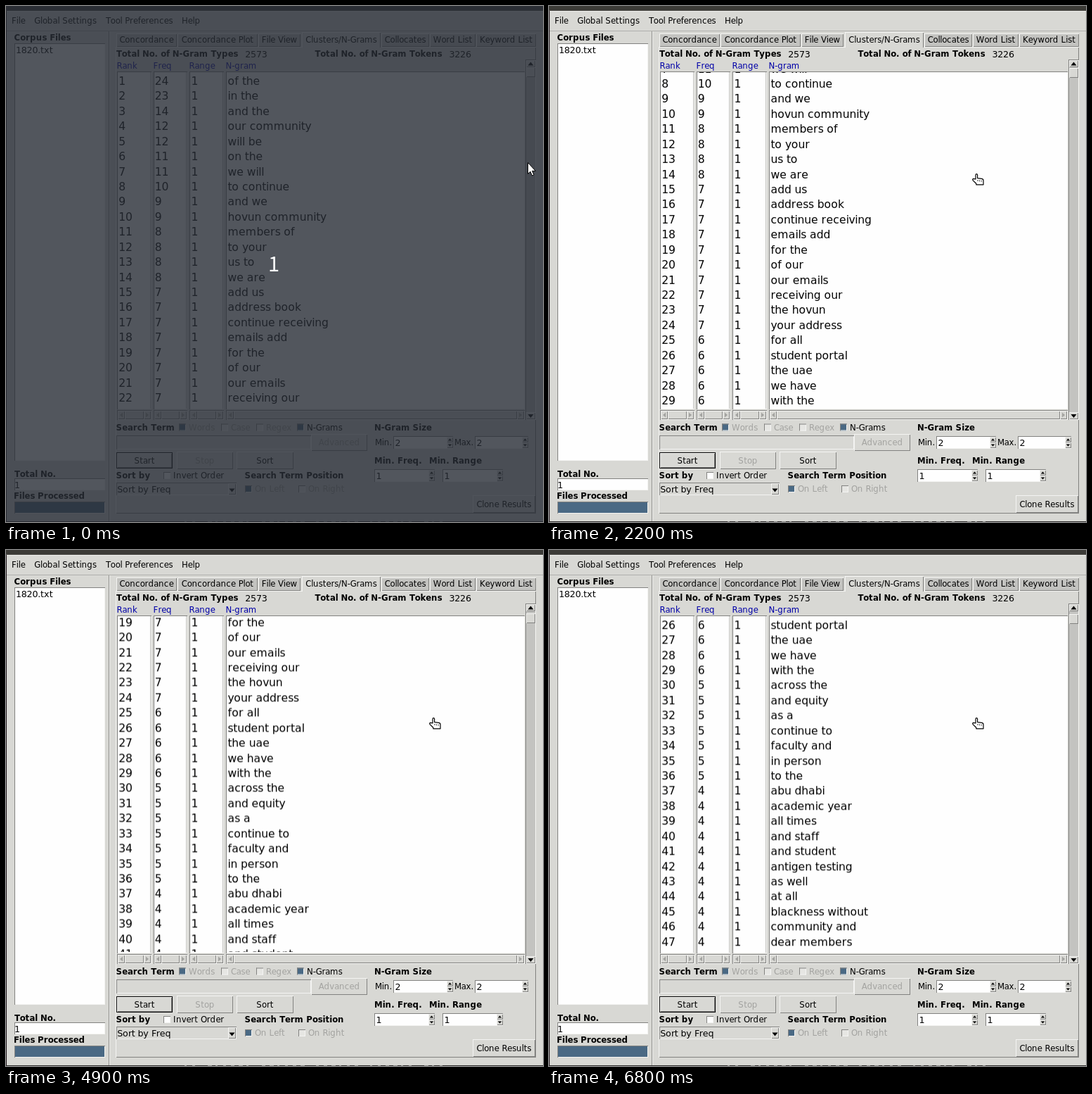
Recreate the animation shown at these times as an HTML page. Size 764 by 733 pixels, loop 8000 ms.

```html
<!DOCTYPE html>
<html lang="en">
<head>
<meta charset="utf-8">
<title>N-gram list</title>
<style>
html, body { margin: 0; width: 100%; height: 100%; overflow: hidden; background: #d8d8d4; }
svg { display: block; width: 764px; height: 733px; }
text { font-family: "DejaVu Sans", sans-serif; white-space: pre; }
</style>
</head>
<body>
<svg id="stage" viewBox="0 0 764 733"></svg>
<script>
const LOOP = 8000;
const SCALE = 0.974;
const BG = '#d8d8d4', WHITE = '#fefefe', DARK = '#828280', TROUGH = '#c3c3c0';
const BLUE = '#4a6984', MUTED = '#a3a3a0', LINK = '#0000a8';
const UI = 12, FIELD = 13, LIST = 16;
const ROW = 22 * SCALE, TICK = 50 * SCALE;

const out = [];
const add = s => out.push(s);
const pen = document.createElement('canvas').getContext('2d');

function rect(x, y, w, h, fill) {
  add(`<rect x="${x}" y="${y}" width="${w}" height="${h}" fill="${fill}"/>`);
}

// box with a one pixel bevel: a = top and left, b = bottom and right
function box(x, y, w, h, fill, a = DARK, b = '#f4f4f2') {
  rect(x, y, w, h, fill);
  rect(x, y + h - 1, w, 1, b);
  rect(x + w - 1, y, 1, h, b);
  rect(x, y, w, 1, a);
  rect(x, y, 1, h, a);
}
const raised = (x, y, w, h, fill = BG) => box(x, y, w, h, fill, '#f4f4f2', DARK);

// the toolkit advances each letter by whole pixels before the window is scaled
function advances(str, size, weight) {
  pen.font = `${weight} 1000px "DejaVu Sans", sans-serif`;
  return [...str].map(c => Math.round(pen.measureText(c).width * size / 1000) * SCALE);
}

// y is the middle of the capitals
function label(x, y, text, { size = UI, fill = '#000', weight = 400, mid = false } = {}) {
  const str = String(text), px = size * SCALE;
  const steps = advances(str, size, weight);
  let at = mid ? x - steps.reduce((a, b) => a + b, 0) / 2 : x;
  const xs = steps.map(w => { const left = at; at += w; return left.toFixed(2); });
  add(`<text x="${xs.join(' ')}" y="${(y + px * 0.365).toFixed(2)}" font-size="${px.toFixed(2)}" ` +
    `font-weight="${weight}" fill="${fill}">${str}</text>`);
}
const bold = (x, y, str) => label(x, y, str, { weight: 700 });
const field = (x, y, str) => label(x, y, str, { size: FIELD });

function tri(x, y, r, dir, fill = '#000') {
  const turn = { up: 0, right: 90, down: 180, left: 270 }[dir];
  add(`<path d="M0 ${-r * 0.6}L${r} ${r * 0.6}H${-r}Z" fill="${fill}" transform="translate(${x} ${y}) rotate(${turn})"/>`);
}

function button(x, y, w, h, str, fill) {
  raised(x, y, w, h);
  label(x + w / 2, y + h / 2, str, { mid: true, fill });
}

function check(x, y, str, on, fill) {
  box(x, y - 5, 10, 10, on ? BLUE : fill ? '#e6e6e3' : WHITE);
  label(x + 14, y, str, { fill });
}

function spin(x, y, w, str) {
  box(x, y, w, 18, WHITE);
  raised(x + w - 9, y + 1, 9, 8);
  raised(x + w - 9, y + 9, 9, 8);
  tri(x + w - 4.5, y + 5, 2.6, 'up');
  tri(x + w - 4.5, y + 13, 2.6, 'down');
  field(x + 2.5, y + 9, str);
}

function hscroll(x, w) {
  box(x, 574, w, 14, TROUGH);
  raised(x + 1, 575, 10, 12);
  raised(x + w - 11, 575, 10, 12);
  raised(x + 11, 575, w - 22, 12);
  tri(x + 6, 581, 3.4, 'left', MUTED);
  tri(x + w - 6, 581, 3.4, 'right', MUTED);
}

// window, menu and left panel
rect(0, 0, 764, 733, BG);
rect(0, 0, 764, 7, '#3c3b37');
rect(0, 6, 764, 1, '#55544f');
rect(0, 7, 1, 726, '#241a20');
rect(0, 732, 764, 1, '#2e2c2c');
for (let i = 0; i < 34; i++) {
  if (i % 7 !== 2) rect(254 + i * 11, 732, 3 + (i * 5) % 4, 1, '#8c8c8a');
}
rect(1, 7, 763, 1, '#f0f0ee');
rect(1, 35, 763, 1, '#b0b0ad');
[['File', 8], ['Global Settings', 40.3], ['Tool Preferences', 142], ['Help', 250]]
  .forEach(([s, x]) => label(x, 21, s));
rect(146, 36, 1, 696, '#8e8e8b');
rect(147, 36, 1, 696, '#f0f0ee');

bold(11.5, 44.5, 'Corpus Files');
box(12, 53, 129, 593, WHITE);
field(14, 62.5, '1820.txt');
bold(12, 664.5, 'Total No.');
box(12, 671, 129, 17, WHITE);
field(12, 680, '1');
bold(11, 695.5, 'Files Processed');
box(12, 704, 129, 17, BLUE);

// notebook
raised(156, 58, 598, 663);
[['Concordance', 157, 86], ['Concordance Plot', 244, 114], ['File View', 359, 60],
 ['Clusters/N-Grams', 421, 112], ['Collocates', 534, 68], ['Word List', 603, 65],
 ['Keyword List', 669, 85]].forEach(([s, x, w], i) => {
  const on = i === 3;
  raised(x, on ? 37 : 39, w, on ? 22 : 19, on ? BG : TROUGH);
  if (on) rect(x + 1, 57, w - 2, 2, BG);
  label(x + w / 2, 48, s, { mid: true });
});

bold(157, 68, 'Total No. of N-Gram Types');
field(340.3, 68, '2573');
bold(439.5, 68, 'Total No. of N-Gram Tokens');
field(630.5, 68, '3226');

// result columns
[['Rank', 158, 49], ['Freq', 210, 48], ['Range', 261, 49], ['N-gram', 313, 425]].forEach(([s, x, w]) => {
  label(x - 0.4, 84.5, s, { fill: LINK });
  box(x, 93, w, 480, WHITE);
  if (w < 60) rect(x + w - 2, 94, 1, 478, TROUGH);
  hscroll(x, w);
});

const grams = ('of the,in the,and the,our community,will be,on the,we will,to continue,and we,' +
  'hovun community,members of,to your,us to,we are,add us,address book,continue receiving,emails add,' +
  'for the,of our,our emails,receiving our,the hovun,your address,for all,student portal,the uae,' +
  'we have,with the,across the,and equity,as a,continue to,faculty and,in person,to the,abu dhabi,' +
  'academic year,all times,and staff,and student,antigen testing,as well,at all,blackness without,' +
  'community and,dear members').split(',');
const head = [24, 23, 14, 12, 12, 11, 11, 10, 9, 9];
const freq = n => head[n - 1] || (n < 15 ? 8 : n < 25 ? 7 : n < 30 ? 6 : n < 37 ? 5 : 4);

add('<clipPath id="view"><rect x="158" y="94" width="579" height="477"/></clipPath>');
add('<g clip-path="url(#view)"><g id="rows">');
grams.forEach((s, i) => {
  const y = 106.3 + i * ROW;
  [[160.3, i + 1], [211.7, freq(i + 1)], [263.4, 1], [315.5, s]]
    .forEach(([x, v]) => label(x, y, v, { size: LIST }));
});
add('</g></g>');

// vertical scrollbar
box(739, 76, 15, 512, TROUGH);
raised(740, 77, 13, 10);
raised(740, 577, 13, 10);
tri(746.5, 82, 4, 'up');
tri(746.5, 582.5, 4, 'down');
add('<g id="thumb">');
raised(740, 87, 13, 14);
add('</g>');

// search options
bold(156.5, 598.5, 'Search Term');
check(246, 598.5, 'Words', true, MUTED);
check(306, 598.5, 'Case', false, MUTED);
check(356, 598.5, 'Regex', false, MUTED);
check(414, 598.5, 'N-Grams', true);
box(157, 610, 277, 20, BG);
button(434, 608, 80, 24, 'Advanced', MUTED);

box(157, 634, 80, 23, BG, '#000', '#000');
raised(158, 635, 78, 21);
label(197, 645.5, 'Start', { mid: true });
button(243, 633, 80, 25, 'Stop', MUTED);
button(328, 633, 81, 25, 'Sort');

bold(156.5, 667, 'Sort by');
check(224, 667, 'Invert Order', false);
bold(339.5, 667, 'Search Term Position');
box(157, 677, 171, 18, BG);
field(158.3, 686, 'Sort by Freq');
raised(316, 678, 11, 16);
tri(321.5, 688, 4, 'down');
check(340, 686, 'On Left', true, MUTED);
check(416, 686, 'On Right', false, MUTED);

bold(524, 598.5, 'N-Gram Size');
label(525, 620, 'Min.');
spin(551, 611, 85, '2');
label(638, 620, 'Max.');
spin(667, 611, 76, '2');
bold(524, 645.5, 'Min. Freq.');
bold(602, 645.5, 'Min. Range');
spin(524, 658, 86, '1');
spin(621, 658, 86, '1');
button(664, 695, 89, 25, 'Clone Results');

// countdown shade and pointers
add('<g id="shade"><rect width="764" height="733" fill="#272c35" opacity=".8"/>' +
  '<text x="381" y="377" font-size="29" fill="#fff" text-anchor="middle" ' +
  'style="font-family:\'Noto Sans CJK SC\',\'Noto Sans CJK JP\',\'DejaVu Sans\',sans-serif">1</text></g>');
add('<path id="arrow" d="M.5 .5V16.5L4 13.2L6.5 19L9 17.9L6.6 12.3H11.4Z" fill="#fff" stroke="#000"/>');
add('<g id="hand" stroke="#000" stroke-linejoin="round" fill="#fff">' +
  '<path d="M5 8V2.2Q5 .7 6.3 .7T7.6 2.2V6.6L13.8 7.4Q16 7.8 16 10V15.8H5.8V14.2L1 9.6Q.2 7.6 2 7.3Z" stroke-width="1.2"/>' +
  '<path d="M8 9v2M10.6 9.3v2M13.2 9.6v2" stroke-width=".8" fill="none"/></g>');

document.getElementById('stage').innerHTML = out.join('');

// plays a table of [ms, value] as hard steps
function play(id, prop, table) {
  const frames = table.map(([ms, v]) => ({ offset: ms / LOOP, [prop]: v, easing: 'step-end' }));
  frames.push({ offset: 1, [prop]: table[table.length - 1][1] });
  document.getElementById(id).animate(frames, { duration: LOOP, iterations: Infinity });
}
const at = (x, y) => `translate(${x}px, ${y}px)`;
const AWAY = at(-99, -99);

const wheel = [[0, 0], [1500, 1], [2200, 3], [3200, 5], [4000, 7], [4900, 8], [5800, 9], [6000, 10], [6800, 11]];
play('rows', 'transform', wheel.map(([ms, k]) => [ms, at(0, -k * TICK)]));
play('thumb', 'transform', wheel.map(([ms, k]) => [ms, at(0, Math.floor(k * 0.433))]));
play('shade', 'opacity', [[0, 1], [100, 0]]);
play('arrow', 'transform', [[0, at(742, 222)], [100, AWAY], [300, at(740, 72)], [400, AWAY]]);
play('hand', 'transform', [[0, AWAY], [400, at(700, 150)], [500, at(632, 220)], [600, at(602, 238)]]);
</script>
</body>
</html>
```
